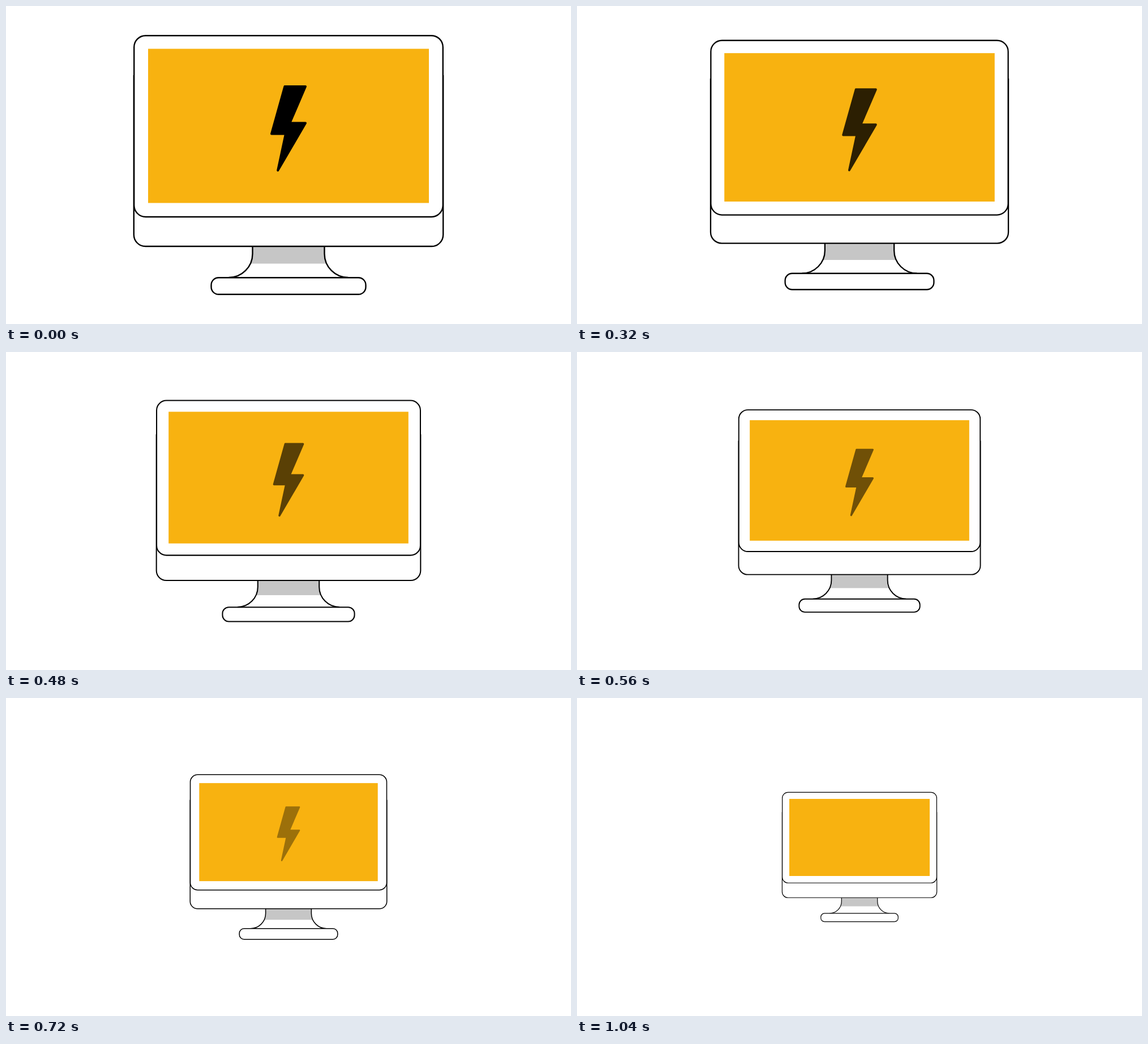
Write an HTML page that moves like this. It is 998x561 px and loops after 3000 ms.

```html
<!DOCTYPE html>
<html lang="en">
<head>
<meta charset="utf-8">
<title>Shrinking monitor</title>
<style>
  html, body { margin: 0; width: 100%; height: 100%; overflow: hidden; background: #fff; }
  svg { display: block; width: 100%; height: 100%; }
  .outline { fill: #fff; stroke: #000; stroke-width: 2.4; }
</style>
</head>
<body>
<svg viewBox="0 0 998 561">
  <g id="monitor">
    <path fill="#c6c6c6" d="M435.5 424V437A42 42 0 0 1 431.7 454.5H566.3A42 42 0 0 1 562.5 437V424Z"/>
    <path class="outline" style="fill:none" d="M435.5 424V437A42 42 0 0 1 393.5 479M562.5 424V437A42 42 0 0 0 604.5 479"/>
    <rect class="outline" x="362.5" y="479.2" width="273" height="29.6" rx="13"/>
    <path class="outline" d="M225.8 122V403.5A20.5 20.5 0 0 0 246.3 424H751.7A20.5 20.5 0 0 0 772.2 403.5V122"/>
    <rect class="outline" x="226.2" y="52.2" width="545.6" height="319.8" rx="20.5"/>
    <rect x="251" y="75.5" width="496" height="272" fill="#f8b210"/>
    <path id="bolt" stroke="#000" stroke-width="4" stroke-linejoin="round"
      d="M492.4 142H529L501.3 206.5H529L480.2 290L494 225.5H469Z"/>
  </g>
</svg>
<script>
  const LOOP = 3000, STEP = 40, START = 160, DURATION = 880;
  const monitor = document.getElementById('monitor');
  const bolt = document.getElementById('bolt');

  // Cubic bezier easing (.39, 0, .59, 1), solved for x by bisection.
  function ease(x) {
    let low = 0, high = 1;
    for (let i = 0; i < 24; i++) {
      const s = (low + high) / 2, r = 1 - s;
      if (3 * .39 * s * r * r + 3 * .59 * s * s * r + s ** 3 < x) low = s;
      else high = s;
    }
    return low * low * (3 - 2 * low);
  }

  function draw(now) {
    const time = Math.floor(now % LOOP / STEP) * STEP;
    const progress = Math.min(1, Math.max(0, (time - START) / DURATION));
    const scale = 1 - ease(progress) / 2;
    monitor.setAttribute('transform', `translate(499 280.5) scale(${scale}) translate(-499 -280.5)`);
    bolt.setAttribute('opacity', 1 - progress);
  }

  function tick() {
    draw(performance.now());
    requestAnimationFrame(tick);
  }
  tick();
</script>
</body>
</html>
```
